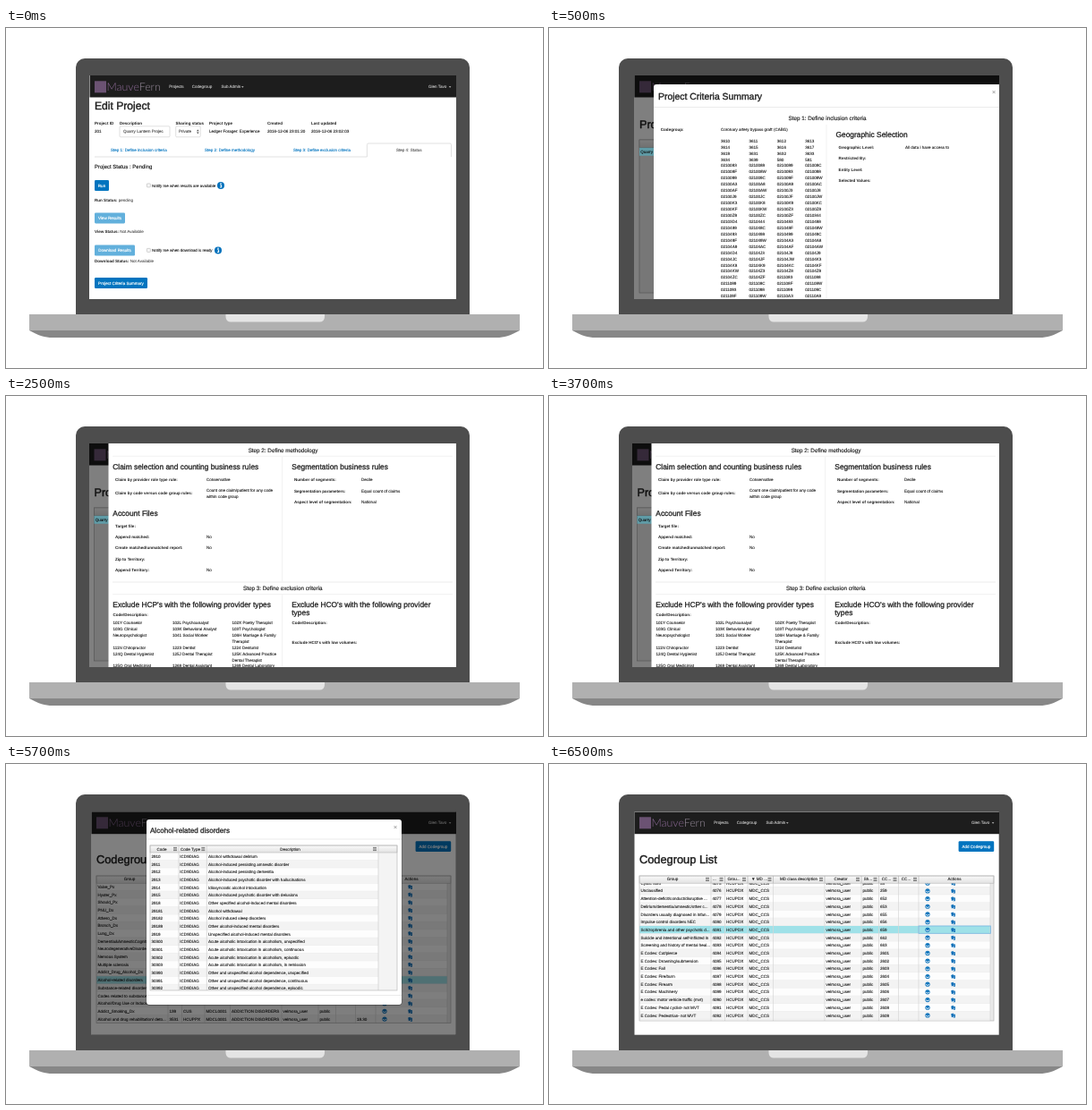
Recreate the animation shown at these times as an HTML page. Size 600 px wide and 380 px high, loop 8000 ms.

```html
<!DOCTYPE html>
<html lang="en">
<head>
<meta charset="utf-8">
<title>Project status on a laptop</title>
<style>
  html, body { margin: 0; width: 100%; height: 100%; overflow: hidden; background: #fff; }
  svg { display: block; width: 600px; height: 380px; }
  text { font-family: "Liberation Sans", Arial, sans-serif; text-rendering: geometricPrecision; white-space: pre; }
  .b { font-weight: bold; }
  .brand { font-family: Lato, sans-serif; font-weight: 300; }
  .scene { opacity: 0; animation: 8s step-end infinite; }
  #status { animation-name: status; }
  #criteria { animation-name: criteria; }
  #rules { animation-name: rules; }
  #codes { animation-name: codes; }
  #groups { animation-name: groups; }
  @keyframes status { 0% { opacity: 1 } 6.25%, 100% { opacity: 0 } }
  @keyframes criteria { 0% { opacity: 0 } 6.25% { opacity: 1 } 31.25%, 100% { opacity: 0 } }
  @keyframes rules { 0% { opacity: 0 } 31.25% { opacity: 1 } 56.25%, 100% { opacity: 0 } }
  @keyframes codes { 0% { opacity: 0 } 56.25% { opacity: 1 } 81.25%, 100% { opacity: 0 } }
  @keyframes groups { 0% { opacity: 0 } 81.25%, 100% { opacity: 1 } }
</style>
</head>
<body>
<svg viewBox="0 0 600 380">
  <defs>
    <clipPath id="screen"><rect x="93" y="53" width="410" height="250"/></clipPath>
    <clipPath id="rows"><rect x="101" y="133" width="396" height="156.5"/></clipPath>
    <clipPath id="names"><rect x="101" y="125" width="79.5" height="170"/></clipPath>
    <linearGradient id="head" x2="0" y2="1"><stop stop-color="#fafafa"/><stop offset="1" stop-color="#e2e2e2"/></linearGradient>
    <g id="eye"><circle r="2.6" fill="#1477bd"/><path d="M-2 .2Q0 2.400 2 .2" fill="none" stroke="#fff" stroke-width=".8"/></g>
    <g id="copy" fill="#0f6fb8"><path d="M-2.300-1.600L.2-2.400 .9 1.300-1.600 2.300zM.5-1.500L2.400-1.200V2.600H-.3L1.300 1.600z"/></g>
    <g id="info"><circle r="4" fill="#0071bc"/><path d="M-.9-.7H.6V1.8M-1.1 1.9H1.2" fill="none" stroke="#fff" stroke-width="1"/><circle cy="-2.2" r=".8" fill="#fff"/></g>
  </defs>
  <path d="M78 320V44a10 10 0 0 1 10-10H508a10 10 0 0 1 10 10V320z" fill="#4d4d4d"/>
  <path d="M26 320H574V338H26z" fill="#b0b0b0"/>
  <path d="M26 338H574C563 344 557 346 548 346H52C43 346 37 344 26 338z" fill="#878787"/>
  <path d="M245.500 320H356v2.500q0 6-6 6H251.500q-6 0-6-6z" fill="#e4e4e4"/>
  <g id="stage" clip-path="url(#screen)"></g>
</svg>
<script>
const SIZE = 4.55, BLUE = '#0074bf', STEP = 8.69;

const rect = (x, y, w, h, fill, more = '') =>
  `<rect x="${x}" y="${y}" width="${w}" height="${h}" fill="${fill}" ${more}/>`;
const line = (x1, y1, x2, y2, color = '#e3e3e3') =>
  `<path d="M${x1} ${y1}L${x2} ${y2}" stroke="${color}" stroke-width=".7"/>`;
const esc = s => String(s).replace(/&/g, '&amp;');
const text = (x, y, s, { size = SIZE, fill = '#1c1c1c', cls = '', anchor = 'start', heavy = .1 } = {}) =>
  `<text x="${x}" y="${y}" font-size="${size}" fill="${fill}" class="${cls}" text-anchor="${anchor}"` +
  ` stroke="${fill}" stroke-width="${heavy}">${esc(s)}</text>`;
const bold = (x, y, s) => text(x, y, s, { cls: 'b', heavy: 0 });
const title = (x, y, s, size = 8.4) => text(x, y, s, { size, heavy: size * .032 });
const step = (x, y, s) => text(x, y, s, { size: 6.3, anchor: 'middle', heavy: .15 });
const use = (id, x, y) => `<use href="#${id}" x="${x}" y="${y}"/>`;
const button = (x, y, w, h, s, fill = BLUE) =>
  rect(x, y, w, h, fill, 'rx="1.3"') +
  text(x + w / 2, y + h / 2 + 1.7, s, { fill: '#fff', anchor: 'middle', heavy: .16 });
const cross = (x, y) => text(x, y, '×', { size: 7, fill: '#999', anchor: 'middle' });
const shade = x => rect(x, 53, 503 - x, 250, '#000', 'opacity=".5"');

function nav(x, top = 53) {
  const link = (dx, s) => text(x + dx, 67.4, s, { fill: '#ccc' });
  return rect(x - 5.5, top, 420, 24.5, '#1d1d1d') +
    rect(x, 59.3, 13, 13, '#6b5273') +
    `<text x="${x + 13.5}" y="70.3" font-size="12.4" class="brand" fill="#8d6a97">Mauve<tspan fill="#978b9b">Fern</tspan></text>` +
    link(83.2, 'Projects') + link(108.7, 'Codegroup') + link(141.4, 'Sub Admin') +
    `<path d="M${x + 164} 65.300h2.600l-1.300 1.500z" fill="#ccc"/>` +
    text(472, 67.4, 'Glen Tavo', { fill: '#ccc' }) +
    '<path d="M494.800 65.300h2.600l-1.300 1.500z" fill="#ccc"/>';
}

function statusPage() {
  const box = (x, w) => rect(x, 109.8, w, 12, '#fff', 'stroke="#ccc" stroke-width=".6" rx="1"');
  const notify = (y, s) =>
    rect(157.4, y - 3.8, 4, 4, '#f6f6f6', 'stroke="#b5b5b5" stroke-width=".6" rx=".7"') +
    text(163, y, s, { size: 4.45 });
  const state = (y, k, v) =>
    `<text x="99" y="${y}" font-size="${SIZE}" fill="#1c1c1c"><tspan class="b">${k}</tspan> ${v}</text>`;
  const heads = [[99, 'Project ID'], [127, 'Description'], [189.5, 'Sharing status'],
    [227, 'Project type'], [292, 'Created'], [341, 'Last updated']];
  const tabs = [[117, 'Step 1: Define inclusion criteria'], [222, 'Step 2: Define methodology'],
    [321, 'Step 3: Define exclusion criteria']];
  return rect(93, 53, 410, 250, '#fff') + nav(99) +
    title(99, 90.6, 'Edit Project', 12.1) +
    heads.map(([x, s]) => bold(x, 107.7, s)).join('') +
    box(127, 56) + box(189.7, 27.5) +
    text(99, 116.9, '201') + text(131, 117.3, 'Quarry Lantern Projec', { fill: '#444' }) +
    text(193, 117.3, 'Private', { fill: '#444' }) +
    '<path d="M213 115.200l1.300-1.800 1.300 1.800zM213 116.400l1.300 1.800 1.300-1.800z" fill="#444"/>' +
    text(227, 116.9, 'Ledger Forager: Experience') +
    text(292, 116.9, '2016-12-06 23:01:20') + text(341, 116.9, '2016-12-06 23:02:03') +
    line(99, 144, 403.4, 144, '#d5d5d5') +
    '<path d="M403.400 144V130.500q0-1.500 1.500-1.500H496q1.500 0 1.500 1.500V144" fill="none" stroke="#d5d5d5" stroke-width=".7"/>' +
    tabs.map(([x, s]) => text(x, 138, s, { fill: BLUE })).join('') +
    text(436, 138, 'Step 4: Status', { fill: '#555' }) +
    text(99, 157.2, 'Project Status : Pending', { size: 6, heavy: .15 }) +
    button(99, 170, 16, 12, 'Run') +
    notify(177.7, 'Notify me when results are available') + use('info', 240, 176) +
    state(194.2, 'Run Status:', 'pending') +
    button(99, 206.4, 34, 12, 'View Results', '#62b0dc') +
    state(228.6, 'View Status:', 'Not Available') +
    button(99, 242.6, 45, 12, 'Download Results', '#62b0dc') +
    notify(250.2, 'Notify me when download is ready') + use('info', 237, 248.5) +
    state(261.8, 'Download Status:', 'Not Available') +
    button(99, 279, 59, 12, 'Project Criteria Summary');
}

function backdrop(left, x) {
  return rect(left, 53, 410, 250, '#fff') + nav(x) +
    title(x, 112, 'Projects', 12.6) +
    rect(x, 125, 30, 171, '#f0f0f0', 'stroke="#aaa" stroke-width=".7"') +
    rect(x, 125, 30, 8.5, 'url(#head)', 'stroke="#aaa" stroke-width=".6"') + shade(left) +
    rect(x, 133.8, 30, 9, '#5f9ba6') + text(x + 1.2, 139.9, 'Quarry', { fill: '#111' });
}

const codeRows = `3610 3611 3612 3613|3614 3615 3616 3617|3619 3631 3632 3633|3634 3639 580 581
0210083 0210088 0210089 021008C|021008F 021008W 0210093 0210098|0210099 021009C 021009F 021009W
02100A3 02100A8 02100A9 02100AC|02100AF 02100AW 02100J3 02100J8|02100J9 02100JC 02100JF 02100JW
02100K3 02100K8 02100K9 02100KC|02100KF 02100KW 02100Z3 02100Z8|02100Z9 02100ZC 02100ZF 0210344
02103D4 0210444 0210483 0210488|0210489 021048C 021048F 021048W|0210493 0210498 0210499 021049C
021049F 021049W 02104A3 02104A8|02104A9 02104AC 02104AF 02104AW|02104D4 02104J3 02104J8 02104J9
02104JC 02104JF 02104JW 02104K3|02104K8 02104K9 02104KC 02104KF|02104KW 02104Z3 02104Z8 02104Z9
02104ZC 02104ZF 0211083 0211088|0211089 021108C 021108F 021108W|0211093 0211098 0211099 021109C
021109F 021109W 02110A3 02110A8`.split(/[|\n]/);

function criteriaPage() {
  const labels = ['Geographic Level:', 'Restricted By:', 'Entity Level:', 'Selected Values:'];
  return backdrop(95, 101) +
    rect(117, 63, 400, 260, '#fff', 'rx="3"') +
    title(122, 79.6, 'Project Criteria Summary', 10.4) + cross(497, 74) +
    line(117, 88.5, 503, 88.5) + step(311, 103, 'Step 1: Define inclusion criteria') +
    line(310, 108, 310, 303, '#ececec') +
    bold(124.8, 115.2, 'Codegroup:') + text(192, 115.2, 'Coronary artery bypass graft (CABG)') +
    codeRows.map((row, i) => row.split(' ').map((c, j) =>
      text(192 + j * 31.4, 127.7 + i * 6.94, c)).join('')).join('') +
    title(320.5, 122, 'Geographic Selection') +
    labels.map((s, i) => bold(323.6, 134.8 + i * 12.4, s)).join('') +
    text(398, 134.8, 'All data i have access to');
}

function rulesPage() {
  const pairs = [[95.3, 'Claim by provider role type rule:', 'Conservative'],
    [110.3, 'Claim by code versus code group rules:', ''],
    [146.5, 'Target file:', ''], [158.8, 'Append matched:', 'No'],
    [171.2, 'Create matched/unmatched report:', 'No'], [183.8, 'Zip to Territory:', ''],
    [196.2, 'Append Territory:', 'No']];
  const segments = [['Number of segments:', 'Decile'], ['Segmentation parameters:', 'Equal count of claims'],
    ['Aspect level of segmentation:', 'National']];
  const types = ['101Y Counselor|102L Psychoanalyst|102X Poetry Therapist',
    '103G Clinical|103K Behavioral Analyst|103T Psychologist',
    'Neuropsychologist|1041 Social Worker|106H Marriage & Family', '||Therapist',
    '111N Chiropractor|1223 Dentist|1224 Denturist',
    '124Q Dental Hygienist|125J Dental Therapist|125K Advanced Practice', '||Dental Therapist',
    '125Q Oral Medicinist|1268 Dental Assistant|1269 Dental Laboratory'];
  return backdrop(93, 98.5) + rect(114.5, 53, 400, 250, '#fff') +
    step(309.5, 63.2, 'Step 2: Define methodology') + line(119, 67.3, 499, 67.3, '#ececec') +
    line(308.5, 68, 308.5, 207, '#ececec') +
    title(119.3, 82.2, 'Claim selection and counting business rules') +
    title(319.3, 82.2, 'Segmentation business rules') +
    pairs.map(([y, k, v]) => bold(122, y, k) + text(224, y, v)).join('') +
    text(224, 107, 'Count one claim/patient for any code') + text(224, 113.8, 'within code group') +
    title(119.3, 133.8, 'Account Files') +
    segments.map(([k, v], i) => bold(322, 95.3 + i * 12.4, k) + text(397, 95.3 + i * 12.4, v)).join('') +
    line(119, 208, 499, 208) + step(309.3, 217.2, 'Step 3: Define exclusion criteria') +
    line(119, 221.5, 499, 221.5, '#ececec') + line(308.5, 222, 308.5, 303, '#ececec') +
    title(119.3, 236.2, "Exclude HCP's with the following provider types") +
    title(319.3, 236.2, "Exclude HCO's with the following provider") + title(319.3, 245.2, 'types') +
    bold(119.5, 245.9, 'Code/Description:') + bold(319.5, 255.2, 'Code/Description:') +
    bold(319.5, 277.2, "Exclude HCO's with low volumes:") +
    types.map((row, i) => row.split('|').map((s, j) =>
      text(119.5 + j * 66.5, 254.8 + i * 6.95, s)).join('')).join('');
}

const menu = (x, y) => [-1.6, 0, 1.6].map(d => line(x - 2, y + d, x + 2, y + d, '#444')).join('');
const cols = [101, 181, 196.5, 222, 250.5, 308, 349, 368.5, 390.5, 413, 493];
const heads = [[138, 'Group'], [185, '...'], [206.5, 'Grou...'], [235, '▼ MD ...'], [279, 'MD class description'],
  [326, 'Creator'], [356.5, 'Sh...'], [377, 'CC...'], [399, 'CC...'], [453, 'Actions']];

// Cells per row: group, id, source, class, class description, creator, sharing, two codes
function groupPage(list, first, active, bottom) {
  const rows = list.map((cells, i) => {
    const y = first + i * STEP;
    const fill = i === active ? '#9fe1e8' : i % 2 ? '#f3f3f3' : '#fdfdfd';
    return rect(101, y - 4.35, 392, STEP, fill) + line(101, y + 4.35, 493, y + 4.35, '#e6e6e6') +
      cells.map((s, j) => s && (j ? text(cols[j] + 1.5, y + 1.6, s)
        : `<g clip-path="url(#names)">${text(102.5, y + 1.6, s)}</g>`)).join('') +
      use('eye', 423, y) + use('copy', 451.5, y);
  }).join('');
  return rect(95.5, 53.5, 407.2, 249.2, '#fff') + nav(101, 53.7) +
    title(101, 111.3, 'Codegroup List', 12.8) + button(457.6, 86.2, 39.6, 11.8, 'Add Codegroup') +
    `<g clip-path="url(#rows)">${rows}</g>` +
    rect(493, 133, 4, bottom - 133, '#e9e9e9') +
    cols.slice(1).map(x => line(x, 133, x, bottom, '#d6d6d6')).join('') +
    rect(101, 125, 396, 8.2, 'url(#head)', 'stroke="#aaa" stroke-width=".5"') +
    heads.map(([x, s], i) => text(x, 130.4, s, { anchor: 'middle' }) +
      (i < 9 ? menu(cols[i + 1] - 4, 128.9) + line(cols[i + 1], 125, cols[i + 1], 133, '#b5b5b5') : '')).join('') +
    rect(101, 125, 396, bottom - 125, 'none', 'stroke="#b5b5b5" stroke-width=".7"');
}

const USER = 'velmora_user';
const hcup = (name, id, code) => [name, id, 'HCUPDX', 'MDC_CCS', '', USER, 'public', code];
const groupRows = `Cystic fibro|58
Unclassified|259
Attention-deficit/conduct/disruptive ...|652
Delirium/dementia/amnestic/other c...|653
Disorders usually diagnosed in infan...|655
Impulse control disorders NEC|656
Schizophrenia and other psychotic d...|659
Suicide and intentional self-inflicted in|662
Screening and history of mental heal...|663
E Codes: Cut/pierce|2601
E Codes: Drowning/submersion|2602
E Codes: Fall|2603
E Codes: Fire/burn|2604
E Codes: Firearm|2605
E Codes: Machinery|2606
e codes: motor vehicle traffic (mvt)|2607
E Codes: Pedal cyclist- not MVT|2608
E Codes: Pedestrian- not MVT|2609`.split('\n').map((s, i) => hcup(s.split('|')[0], 4075 + i, s.split('|')[1]));

const otherRows = `Valve_Px|Hyster_Px|Should_Px|PNU_Dx|Athero_Dx|Bronch_Dx|Lung_Dx|Dementia&AmnesticCognitive
NeurodegenerativeDisorders|Nervous System|Multiple sclerosis|Addict_Drug_Alcohol_Dx|Alcohol-related disorders
Substance-related disorders|Codes related to substance|Alcohol/Drug Use or Induced|Addict_Smoking_Dx
Alcohol and drug rehabilitation/ deto...`.split(/[|\n]/).map(s => [s]);
const tail = ['MDCL0001', 'ADDICTION DISORDERS', USER, 'public', ''];
otherRows[16].push('139', 'CUS', ...tail);
otherRows[17].push('3531', 'HCUPPX', ...tail, '18.30');

const diagnoses = `2910 Alcohol withdrawal delirium
2911 Alcohol-induced persisting amnestic disorder
2912 Alcohol-induced persisting dementia
2913 Alcohol-induced psychotic disorder with hallucinations
2914 Idiosyncratic alcohol intoxication
2915 Alcohol-induced psychotic disorder with delusions
2918 Other specified alcohol-induced mental disorders
29181 Alcohol withdrawal
29182 Alcohol induced sleep disorders
29189 Other alcohol-induced mental disorders
2919 Unspecified alcohol-induced mental disorders
30300 Acute alcoholic intoxication in alcoholism, unspecified
30301 Acute alcoholic intoxication in alcoholism, continuous
30302 Acute alcoholic intoxication in alcoholism, episodic
30303 Acute alcoholic intoxication in alcoholism, in remission
30390 Other and unspecified alcohol dependence, unspecified
30391 Other and unspecified alcohol dependence, continuous
30392 Other and unspecified alcohol dependence, episodic`.split('\n');

function codesPage() {
  const rows = diagnoses.map((s, i) => {
    const y = 103.3 + i * 8.67, cut = s.indexOf(' ');
    return rect(161, y - 4.33, 255, 8.67, i % 2 ? '#f3f3f3' : '#fdfdfd') +
      line(161, y + 4.33, 416, y + 4.33, '#e6e6e6') +
      text(162.5, y + 1.6, s.slice(0, cut)) + text(194.3, y + 1.6, 'ICD9DIAG') + text(226, y + 1.6, s.slice(cut + 1));
  }).join('');
  return groupPage(otherRows, 137.3, 12, 289.5) + shade(95.5) +
    rect(156.5, 62, 286, 208, '#000', 'rx="4" opacity=".3"') + rect(157, 62, 285, 207, '#fff', 'rx="3"') +
    title(161, 77, 'Alcohol-related disorders', 8.05) + cross(435, 73.2) + line(157, 84, 442, 84) +
    rect(416, 99, 21, 154, '#f4f4f4') + rows +
    rect(161, 91, 276, 8, 'url(#head)', 'stroke="#aaa" stroke-width=".5"') +
    [193, 224.3, 416].map(x => line(x, 91, x, 253, '#cfcfcf') + menu(x - 4, 95)).join('') +
    text(174, 96.6, 'Code', { anchor: 'middle' }) + text(206, 96.6, 'Code Type', { anchor: 'middle' }) +
    text(317.500, 96.6, 'Description', { anchor: 'middle' }) +
    rect(157.5, 253, 284, 12, '#fff') +
    rect(161, 91, 276, 162, 'none', 'stroke="#bbb" stroke-width=".7"') + line(157, 258.5, 442, 258.5);
}

const groupsPage = () => groupPage(groupRows, 133.2, 6, 287) +
  rect(413, 181, 80.5, 8.3, 'none', 'stroke="#74b4e2" stroke-width=".8"');

const scenes = { status: statusPage, criteria: criteriaPage, rules: rulesPage, codes: codesPage, groups: groupsPage };
document.getElementById('stage').innerHTML = Object.entries(scenes)
  .map(([id, draw]) => `<g class="scene" id="${id}">${draw()}</g>`).join('');
</script>
</body>
</html>
```
